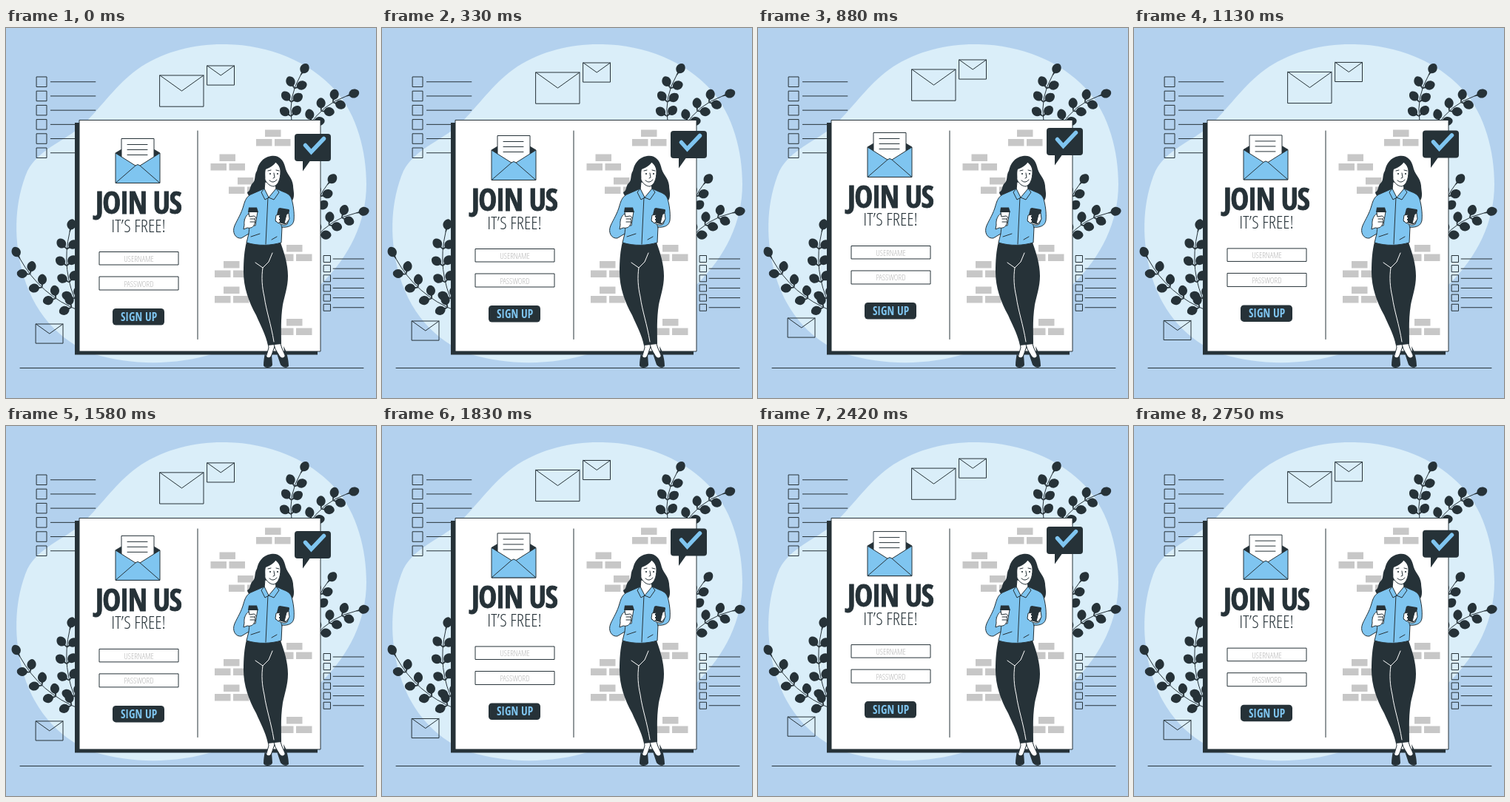
Animation of 500 by 500 pixels, one loop 2.79 s. Source, as an HTML page:

```html
<!DOCTYPE html>
<html lang="en">
<head>
<meta charset="utf-8">
<title>Join us</title>
<style>
  html, body { margin: 0; width: 100%; height: 100%; overflow: hidden; background: #b3d1ee; }
  svg { display: block; width: 100%; height: 100%; }
  .line { fill: none; stroke: #263238; stroke-width: 1; stroke-linejoin: round; stroke-linecap: round; }
  .dark { fill: #263238; }
  .blue { fill: #7fc5f0; }
  .white { fill: #fff; }
  .edge { stroke: #263238; stroke-width: 1; stroke-linejoin: round; }
  .crease { fill: none; stroke: #fff; stroke-width: 1; stroke-linecap: round; stroke-linejoin: round; }
  text { text-anchor: middle; font-stretch: condensed; }
  .bold { font-family: "Open Sans Condensed", "Roboto Condensed", "Open Sans", "Noto Sans", sans-serif; font-weight: 700; }
  .light { font-family: "Open Sans Condensed Light", "Roboto Condensed", "Open Sans", "Noto Sans", sans-serif; font-weight: 300; }
  .title { font-size: 42px; letter-spacing: -1.5px; stroke: #263238; stroke-width: .8; }
  .hint { fill: #b5b5b5; font-size: 11px; }
</style>
</head>
<body>
<svg viewBox="0 0 500 500">
  <path fill="#daeef9" d="M298 22C355 23 410 45 445 84C475 118 487 168 487 211C487 262 464 309 425 347C385 389 330 424 281 440C230 456 170 456 120 441C72 424 35 383 21 325C10 280 12 233 29 193C46 161 84 152 109 126C136 98 152 73 183 52C218 30 258 21 298 22Z"/>
  <path class="line" d="M19 459.5H483"/>
  <g id="lists" class="line"></g>
  <g id="plants"></g>

  <path class="dark" d="M93 128H421V441.5H93Z"/>
  <path class="white edge" d="M99 124.5H425V437H99Z"/>
  <path class="line" d="M259 139V420.5"/>
  <g id="bricks" fill="#c7c7c7"></g>

  <g id="woman">
    <!-- hair behind the shoulders -->
    <path class="dark" d="M358 173C368 171 375 178 377 187C379 198 387 202 388 213C388 219 391 227 387 233C385 237 382 239 379 240L338 232C330 229 327 227 326 222C331 220 329 214 333 210C338 206 335 199 339 193C341 184 346 175 358 173Z"/>
    <!-- feet -->
    <path class="white edge" d="M354 423L355 432L351 446L355 456L359 442L364 427Z"/>
    <path class="white edge" d="M361 424L364 434L373 449L379 455L377 442L373 433L370 424Z"/>
    <path class="dark" d="M350 439C352 447 357 447 359 441L360 455C359 460 349 460 348 456C348 450 349 445 350 439ZM364 434C367 443 374 449 377 443L375 430C380 438 382 450 382 457C379 460 374 459 371 455Z"/>
    <!-- trousers -->
    <path class="dark" d="M325 289L371 290C376 304 381 319 381 335C381 350 376 363 374 374C371 393 372 410 372 427L354 429C351 414 344 402 338 388C328 370 321 350 321 330C321 314 322 301 325 289Z"/>
    <path class="crease" d="M360 304L355 316L347 324L337 317M347 324C345 337 346 350 349 363C352 384 358 399 362 424"/>
    <!-- shirt -->
    <path class="blue edge" d="M349 217L333 224C325 227 323 233 321 240C318 251 313 258 309 267C305 276 310 285 318 284L328 278L325 290C341 295 358 294 372 290L373 269C381 270 388 267 389 260C390 249 388 238 386 231C384 225 379 223 374 221L365 217Z"/>
    <path class="line" d="M354 228L351 292M328 278C329 271 329 263 328 255M373 270C371 265 371 260 373 252M322 259L326 264M331 282L343 278M366 282L359 286"/>
    <path class="white edge" d="M350 208L349 219L355 230L365 218L364 209Z"/>
    <path class="blue edge" d="M349 217L345 222L350 232L355 229ZM365 217L355 229L362 232L369 222Z"/>
    <!-- face and fringe -->
    <path class="white edge" d="M349 188L364 181C368 184 371 188 371 194C371 204 368 212 362 214C355 214 350 207 348 200Z"/>
    <path class="dark" d="M366 179C362 187 355 189 351 191C349 198 352 203 349 210C347 217 342 221 331 224C338 217 334 210 340 201C342 190 345 181 352 176Z"/>
    <path class="line" d="M354 193L358 192M365 192L369 193M362 196L363 202L361 203M356 206Q361 211 366 205"/>
    <circle class="dark" cx="357" cy="197" r="1.1"/><circle class="dark" cx="367" cy="197" r="1.1"/>
    <!-- cup -->
    <path class="white edge" d="M328 248H340L337 267H330Z"/>
    <path class="dark" d="M328 242.5H339L341 249H327Z"/>
    <path class="white edge" d="M322 266C321 259 325 252 328 251L329 255L335 254C338 255 338 257 336 258L337 261L336 264C335 269 331 271 326 270L321 272Z"/>
    <path class="line" d="M330 258H336M330 262H336"/>
    <!-- phone -->
    <path class="white edge" d="M366 254L371 250L380 252L382 260L380 265C376 268 369 265 366 261Z"/>
    <path class="dark" d="M370 243L382 245Q383 245 383 247L379 264Q378 266 376 265L365 262Q363 261 364 260L368 244Z"/>
    <path class="white edge" d="M365 253L371 252L369 255L371 257L369 259L371 261L368 264L364 260ZM379 252L382 250L383 258L379 264L376 264Z"/>
  </g>

  <g id="floating">
    <g id="mails" class="line"></g>
    <rect class="dark" x="390" y="143" width="49" height="37" rx="4"/>
    <path class="dark" d="M401 178V193.5L412 178Z"/>
    <path d="M404.5 158.5L412.5 167.5L429.5 149.5" fill="none" stroke="#7fc5f0" stroke-width="5.5" stroke-linecap="round"/>

    <path class="dark edge" d="M148 169L178 151L208 169L178 188Z"/>
    <path class="white edge" d="M156 149.5H200V195H156Z"/>
    <path class="line" d="M164 157.5H191M164 164.5H191M164 171.5H191"/>
    <path class="blue edge" d="M148 169L178 188L208 169V209.5H148Z"/>
    <path class="blue edge" d="M148 209.5L175 186Q178 183 181 186L208 209.5Z"/>

    <text class="bold dark title" x="178.7" y="251">JOIN US</text>
    <text class="light dark" x="179" y="275.5" font-size="24">IT’S FREE!</text>
    <path class="white edge" d="M126 302.5H233V320H126ZM126 336H233V354H126Z"/>
    <text class="light hint" x="179.5" y="316">USERNAME</text>
    <text class="light hint" x="179.5" y="349.5">PASSWORD</text>
    <rect class="dark" x="144" y="379" width="70" height="22.5" rx="4.5"/>
    <text class="bold blue" x="179.5" y="396" font-size="15.5">SIGN UP</text>
  </g>
</svg>
<script>
const fill = (id, items, draw) => {
  document.getElementById(id).innerHTML = items.map(item => draw(...item)).join('');
};

// Six check boxes, each followed by a ruled line
function checkList(x, y, size, gap, lineLength) {
  let rows = '';
  for (let i = 0; i < 6; i++) {
    const top = y + i * gap;
    rows += `<path d="M${x} ${top}h${size}v${size}h${-size}z
      M${x + size * 1.4} ${top + size / 2}h${lineLength}"/>`;
  }
  return rows;
}

function mail(x, y, width) {
  const height = width * 0.715, flap = height / 2;
  return `<path d="M${x} ${y}h${width}v${height}h${-width}zl${width / 2} ${flap}l${width / 2} ${-flap}"/>`;
}

// One brick centred on top of two
function brickPile(x, y) {
  const brick = (dx, dy) => `<rect x="${x + dx}" y="${y + dy}" width="21.5" height="9.5"/>`;
  return brick(12, 0) + brick(0, 12.5) + brick(25, 12.5);
}

function leaf(x, y, angle) {
  return `<path class="dark" transform="translate(${x} ${y}) rotate(${angle}) scale(17.5)"
    d="M0-.03L.22-.06C.36-.42.8-.44 1-.12Q1.06 0 1 .12C.8.44.36.42.22.06L0 .03Z"/>`;
}

// Bent stem from root to tip with evenly spaced leaf pairs
function plant(x0, y0, x1, y1) {
  const dx = x1 - x0, dy = y1 - y0, bend = 0.18;
  const cx = (x0 + x1) / 2 + dy * bend, cy = (y0 + y1) / 2 - dx * bend;
  const pairs = Math.round(Math.hypot(dx, dy) / 24);
  let shapes = `<path class="line" d="M${x0} ${y0}Q${cx} ${cy} ${x1} ${y1}"/>`;
  for (let i = 0; i <= pairs; i++) {
    const t = 0.1 + 0.9 * i / pairs, u = 1 - t;
    const x = u * u * x0 + 2 * u * t * cx + t * t * x1;
    const y = u * u * y0 + 2 * u * t * cy + t * t * y1;
    const angle = Math.atan2(u * (cy - y0) + t * (y1 - cy), u * (cx - x0) + t * (x1 - cx)) * 180 / Math.PI;
    const turns = i < pairs ? [-48, 48] : [0];
    shapes += turns.map(turn => leaf(x, y, angle + turn)).join('');
  }
  return shapes;
}

fill('lists', [[41.5, 66, 13.5, 19.2, 60.5], [429.5, 307.5, 9, 13.15, 41.5]], checkList);
fill('mails', [[208, 64, 59], [272, 51, 36.5], [40.5, 400, 36.5]], mail);
fill('bricks', [[338, 137.5], [276.5, 170.5], [301, 202], [367, 293], [282, 315], [282, 349.5], [367, 393]], brickPile);
fill('plants', [
  [386, 126, 398, 64], [409, 133, 460, 92], [420, 250, 434, 212],
  [417, 285, 473, 250], [97, 375, 86, 276], [99, 382, 19, 312]
], plant);

// The picture advances 24 times a second; the loose parts float up and back
const LOOP = 2790, STEP = 1000 / 24, PERIOD = 1460, RISE = 10;

function draw() {
  const time = Math.floor(performance.now() % LOOP / STEP) * STEP;
  const phase = time % PERIOD / PERIOD;
  const lift = RISE * (1 - Math.abs(1 - 2 * phase));
  document.getElementById('floating').setAttribute('transform', `translate(0 ${-lift})`);
  requestAnimationFrame(draw);
}
draw();
</script>
</body>
</html>
```
